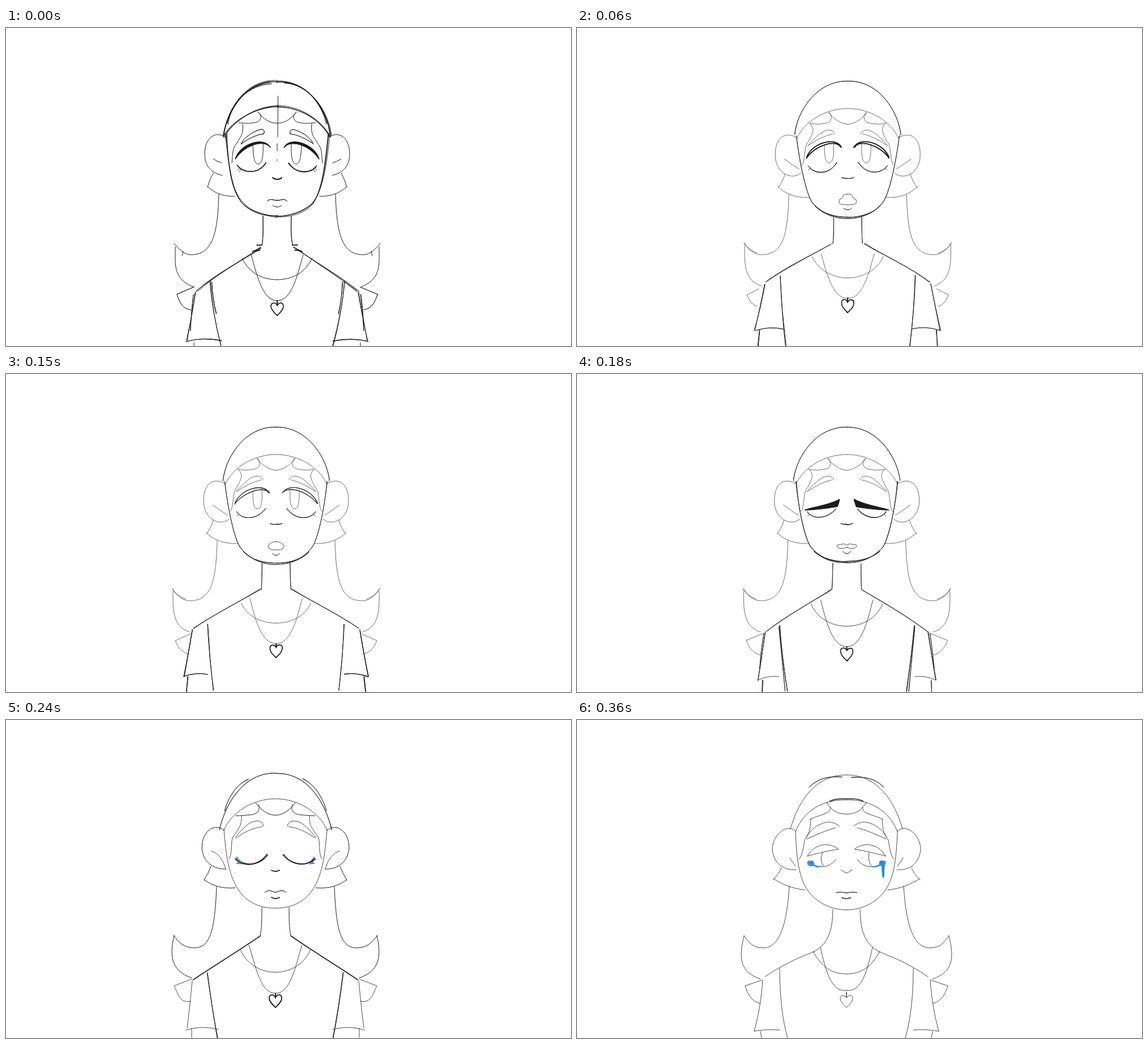
Recreate the animation shown at these times as an HTML page with a canvas. Size 998 by 561 pixels, loop 390 ms.

```html
<!DOCTYPE html>
<html lang="en">
<head>
<meta charset="utf-8">
<title>Sketch loop</title>
<style>
html, body { margin: 0; width: 100%; height: 100%; overflow: hidden; background: #fff; }
canvas { display: block; }
</style>
</head>
<body>
<canvas id="stage" width="998" height="561"></canvas>
<script>
const ctx = document.getElementById('stage').getContext('2d');
const STEP = 30, STEPS = 13, INK = '#1c1c1c', BLUE = '#2389e6';
const axis = [479, 478.2, 477.5, 476.6, 476, 476, 476];

// style key: [strokes, width, jitter, colour, filled]
const styles = {
  l: [1, .65, 0, INK],
  t: [1, .8, 0, INK],
  k: [1, 1, 0, INK],
  d: [2, .8, 1, INK],
  e: [2, 1, 1.2, INK],
  s: [4, .9, 2.6, INK],
  m: [6, .9, 1.7, INK],
  v: [3, 1.2, 1.4, INK],
  h: [2, 1.3, .7, INK],
  b: [1, 1.9, 0, INK],
  f: [2, 1.1, .5, INK, true],
  q: [1, .8, 0, BLUE, true],
  w: [4, .9, 2, BLUE]
};

// Each part: one style per pose, then its path per pose ('' repeats the last).
// x is the distance from the axis; halves are mirrored.
const halves = [
  // headwear
  ['sddddtt',
    'M95 191 C91 148 56 91 0 95', 'M94 188 C90 148 55 92 0 94', '', '',
    'M99 194 C89 148 57 92 0 94', 'M98 190 C86 146 56 95 0 97', 'M99 192 C86 146 56 96 0 97'],
  ['s---d-d', 'M88 168 C78 130 50 100 12 96', '', '', '',
    'M90 160 C82 132 66 112 48 104', 'M86 155 C76 128 60 108 36 101', 'M66 119 C52 104 34 99 8 101'],
  ['slllttt',
    'M92 192 C78 163 40 139 0 139', 'M89 193 C76 165 40 142 0 142', '', '',
    'M91 194 C78 164 42 139 0 139', 'M92 192 C78 163 42 138 0 138', 'M90 197 C76 160 42 140 0 141'],
  ['------e', 'M30 143 C20 138 10 139 0 139'],
  // fringe, curl, side lock
  ['klllkbt',
    'M34 148 C25 160 14 168 0 168', 'M34 149 C25 161 12 169 0 170', '', '',
    'M35 146 C26 158 14 168 0 168', 'M36 145 C24 158 14 169 0 169', 'M35 145 C28 158 19 166 0 166'],
  ['klllkbt',
    'M33 149 C26 154 28 166 40 167 C50 169 58 168 68 167',
    'M33 149 C26 154 27 167 40 168 C50 170 58 170 68 168', '', '',
    'M30 149 C27 156 29 165 42 167 C52 168 60 169 70 169',
    'M27 153 C28 158 28 163 38 168 C46 172 54 174 63 174',
    'M28 153 C29 161 32 163 40 166 C48 169 56 171 64 175'],
  ['kllltlt',
    'M61 169 C59 187 64 191 72 204 C80 214 78 222 80 238',
    'M66 169 C56 180 64 188 69 200 C78 206 74 236 81 242', '', '',
    'M60 169 C60 185 62 188 75 206 C80 215 75 235 82 245',
    'M62 174 C61 195 68 200 75 214 C79 225 77 235 80 241',
    'M63 175 C64 195 66 200 74 212 C76 225 78 240 84 246'],
  // ear, inner ear, lower lobe
  ['klllkbt',
    'M92 193 C105 181 128 190 128 222 C128 246 114 256 97 260',
    'M89 194 C104 184 127 186 128 222 C129 256 99 270 83 256', '', '',
    'M91 195 C104 181 130 193 130 226 C128 250 110 264 87 263',
    'M90 193 C110 181 131 206 131 226 C129 248 113 262 89 260',
    'M90 196 C106 181 131 204 131 228 C129 252 112 266 89 264'],
  ['klllt-t',
    'M113 231 Q105 236 98 238', 'M112 231 Q100 240 86 249', '', '',
    'M113 231 Q96 236 88 262', 'M105 238 Q96 244 89 260', 'M100 243 Q96 250 90 258'],
  ['klllkbt',
    'M113 256 Q120 268 123 281 M123 280 C111 290 99 297 75 297',
    'M111 258 Q114 270 123 282 M123 280 C111 292 94 300 68 299', '', '',
    'M114 258 Q118 270 126 282 M126 282 C110 293 94 298 71 296',
    'M112 258 Q116 270 125 277 M125 278 C110 288 95 293 75 298',
    'M115 261 Q119 272 130 282 M129 280 C112 291 96 297 73 300'],
  // long hair
  ['klllktt',
    'M103 293 C105 360 113 400 152 400 C164 400 174 390 182 380',
    'M104 294 C106 360 112 400 152 400 C165 400 174 392 183 379', '', '',
    'M104 294 C107 360 112 402 143 402 C162 402 170 393 180 380',
    'M102 292 C107 350 110 403 145 403 C165 403 170 395 177 376',
    'M101 293 C105 360 118 402 147 402 C163 402 172 395 181 380'],
  ['klllktt',
    'M180 386 C180 420 184 442 148 457', 'M182 383 C183 420 181 446 153 455', '', '',
    'M179 380 C186 410 188 442 148 455', 'M177 376 C185 415 185 452 148 457',
    'M181 381 C190 418 190 444 152 457'],
  ['klll---', 'M166 394 L168 402', 'M183 379 C178 388 169 394 160 397'],
  ['dlllttt',
    'M147 457 L177 470 C172 486 166 496 153 497',
    'M157 460 L178 471 C174 481 169 488 160 491', '', 'M146 457 L178 470 C172 484 166 492 153 496',
    'M148 457 L179 469 C171 486 168 500 150 496',
    'M147 458 L178 471 C170 488 164 498 152 499', 'M150 459 L179 469 C173 488 166 496 153 500'],
  // face
  ['sddetbt',
    'M91 186 C86 244 80 287 62 309 C46 326 22 332 0 332',
    'M91 190 C85 240 74 290 63 307 C46 328 22 336 0 336',
    'M91 190 C85 240 74 290 64 306 C46 330 22 339 0 339',
    'M90 190 C85 240 74 290 64 305 C46 326 22 333 0 333',
    'M91 193 C87 250 80 282 60 307 C42 327 20 332 0 332',
    'M91 172 C85 235 82 280 66 305 C48 328 26 332 0 332',
    'M90 197 C88 250 83 282 66 304 C46 328 20 335 0 335'],
  ['-eee---', '', 'M58 313 C44 328 20 334 0 334', 'M58 314 C44 331 20 336 0 336', 'M58 312 C44 326 20 331 0 331'],
  // neck, shoulders
  ['edddktt',
    'M25 332 C25 348 24 366 27 382', 'M25 334 C25 350 25 368 26 380', '', '',
    'M24 331 C24 348 24 366 27 381', 'M24 332 C24 350 23 372 30 384', 'M24 334 C25 360 26 392 58 409'],
  ['seeehet',
    'M30 387 C66 412 110 437 143 464', 'M29 381 C66 402 110 422 145 448',
    'M27 379 C66 400 110 420 150 443', 'M27 381 C66 404 108 428 142 454',
    'M27 381 C66 408 106 432 145 458', 'M30 385 C66 408 106 432 145 457',
    'M58 409 C84 419 110 430 144 453'],
  ['h------', 'M27 383 L36 383 M29 387 L44 395 M31 392 L42 393'],
  // collar, necklace
  ['klltttt',
    'M62 406 C50 432 26 444 0 444', 'M63 403 C52 428 26 441 0 441',
    'M60 402 C50 424 26 434 0 434', 'M63 406 C52 432 26 445 0 445',
    'M62 405 C50 432 26 445 0 445', 'M62 404 C48 432 26 447 0 447', 'M59 408 C44 436 26 448 0 448'],
  ['klltttt',
    'M46 400 C37 430 27 482 0 481', 'M47 398 C38 430 27 478 0 477',
    'M46 394 C38 424 27 472 0 470', 'M46 399 C38 430 27 482 0 481',
    'M47 397 C36 430 27 484 0 482', 'M48 398 C38 436 32 468 0 480', 'M46 401 C38 436 28 482 0 477'],
  ['hhhhbtt',
    'M0 481 L0 490 C3 483 11 484 11 491 C11 497 5 502 0 507',
    'M0 476 L0 484 C3 477 11 478 11 485 C11 492 5 497 0 502',
    'M0 470 L0 477 C3 471 11 471 11 478 C11 485 5 490 0 495',
    'M0 481 L0 488 C3 482 11 482 11 489 C11 496 5 501 0 506',
    'M0 483 L0 490 C3 483 11 483 11 491 C11 497 5 502 0 507',
    'M0 483 L0 491 C3 484 12 484 12 491 C12 498 5 503 0 509',
    'M0 480 L0 490 C3 485 11 484 11 491 C11 497 5 502 0 507'],
  // sleeve, cuff, arm, torso
  ['eehettt',
    'M144 466 C148 492 154 522 159 552', 'M147 452 C152 480 158 506 164 533',
    'M152 448 C157 476 163 502 169 527', 'M144 455 C148 482 152 512 157 540',
    'M147 460 C150 490 153 520 156 543', 'M146 458 C148 488 153 520 160 545',
    'M148 458 C150 490 155 520 163 549'],
  ['edetttt',
    'M161 553 Q132 545 98 552', 'M164 534 Q138 525 113 531', 'M169 527 Q144 521 121 526',
    'M157 540 Q138 531 120 534', 'M158 547 Q130 538 101 546', 'M160 545 Q138 540 115 544',
    'M163 549 Q140 545 118 547'],
  ['kehettt',
    'M147 555 L147 561', 'M156 533 L159 561', 'M162 528 L167 560', 'M149 540 L150 560',
    'M148 544 L148 560', 'M149 544 L149 561', 'M152 549 L150 561'],
  ['eeeeett',
    'M119 446 Q115 500 99 561', 'M119 437 Q117 500 110 561', 'M122 440 Q121 500 117 556',
    'M119 444 Q114 500 105 560', 'M120 446 Q112 510 102 561', 'M119 440 Q120 512 108 561',
    'M118 438 Q118 512 104 561'],
  ['e--d---', 'M116 448 Q114 480 108 504 M148 470 Q152 500 153 534', '', '',
    'M120 446 Q114 510 109 560 M147 458 Q152 490 154 520'],
  // nose, mouth, chin
  ['beeebtt', 'M8 264 Q5 267 0 267', 'M10 264 Q6 266 0 265.5', '', '',
    'M7 265 Q4 267 0 267', 'M9 264 Q5 269 0 268', 'M10 264 Q4 269 0 270'],
  ['ktttttt',
    'M0 304 C6 305 12 299 18 306 C12 299 6 305 0 304',
    'M0 293 C12 292 5 300 14 302 C19 313 8 311 0 312',
    'M0 290 C5 292 11 297 11 303 C11 310 5 314 0 314',
    'M0 302 C6 297 10 302 16 301 C21 308 8 309 0 306',
    'M0 304 C6 303 12 297 19 305 C12 297 6 303 0 304',
    'M0 305 C6 304 10 300 19 306 C10 300 6 304 0 305',
    'M0 305 C6 305 10 302 19 305 C10 302 6 305 0 305'],
  ['kkkkbte', 'M8 313 Q4 316 0 316', 'M7 318 Q4 321 0 321', 'M6 320 Q3 323 0 323',
    'M7 313 Q4 317 0 317', 'M7 313 Q4 315 0 315', 'M8 313 Q4 316 0 316', 'M8 314 Q4 315 0 315'],
  // brow
  ['dlllttt',
    'M63 204 C60 193 38 180 27 179 Q20 181 24 187 M24 187 Q42 189 64 204',
    'M71 208 C58 194 46 180 32 180 Q25 181 23 187 M27 187 Q46 191 69 207', '', '',
    'M71 207 C60 194 48 178 31 178 Q23 179 21 187 M23 188 Q46 191 70 208',
    'M69 210 C58 196 44 182 29 182 Q22 183 20 188 M24 187 Q46 189 69 210',
    'M71 207 C62 190 44 180 30 180 Q20 181 13 187 M19 190 Q38 195 70 210'],
  // eyelid, lower lid, lashes
  ['fvef-dt',
    'M74 231 C66 204 22 190 12 211 C24 195 58 207 74 231',
    'M73 229 C65 203 22 190 11 210 C22 195 57 207 73 229',
    'M73 229 C65 203 22 190 11 210 C22 196 57 208 73 229',
    'M74 240 C58 234 32 232 13 221 C14 226 15 230 17 234 C36 237 55 240 74 240',
    'M71 244 C55 256 30 256 13 235 C28 262 52 262 71 244',
    'M69 238 C52 222 26 212 15 224 C30 224 52 230 69 238',
    'M69 240 C56 217 30 215 14 228 C30 230 50 235 69 240'],
  ['veee-dt',
    'M70 243 C60 257 34 258 20 238', 'M70 243 C60 258 32 260 19 237', '', 'M70 243 C60 258 34 256 19 238',
    '', 'M69 246 C56 266 32 264 17 245', 'M67 248 C56 262 32 264 19 246'],
  ['ttttt--', 'M70 251 L66 246 M67 254 L64 249', 'M69 251 L66 247', '', '',
    'M70 242 L65 252 M68 241 L63 249'],
  ['----m--', '', '', '', '', 'M70 245 C55 260 28 257 14 237'],
  ['kll----', 'M43 207 C42 226 41 240 33 240 C26 240 24 222 25 205',
    'M41 206 C41 224 40 238 33 238 C25 238 24 222 25 204'],
  // tears
  ['----q--', '', '', '', '', 'M69 253 L64 250 L60 254 Z'],
  ['-----ww', '', '', '', '', 'M69 249 C78 262 48 262 52 257 C56 249 66 262 48 259 C54 252 64 262 69 249',
    'M68 250 C70 260 57 259 58 251 C64 244 72 256 62 256 C57 255 53 261 45 258'],
  ['-----dq', '', '', '', '', 'M68 248 Q60 259 48 258', 'M66 250 Q59 246 58 253 Q64 258 66 250 Z']
];

const wholes = [
  ['k------', 'M1.5 120 L1 192 M0 204 L0 217 M0 232 L0 234'],
  ['-----dt', '', '', '', '', 'M-38 228 C-43 238 -42 252 -38 258 M45 233 C42 244 44 252 47 258',
    'M-42 234 C-47 243 -45 252 -40 258 M40 234 C38 244 40 252 44 257'],
  ['-----t-', '', '', '', '', 'M-33 228 C-38 240 -37 250 -37 258 M-16 226 L-16 240 M17 226 L17 238'],
  ['------w', '', '', '', '', '', 'M68 249 C66 262 65 270 65 277 C62 270 64 262 63 251'],
  ['------q', '', '', '', '', '', 'M67 252 L66 277 L64 277 L63 260 Z']
];

function fill(part) {
  const poses = [];
  for (let i = 0; i < 7; i++) poses.push(part[i + 1] || poses[i - 1] || '');
  return { keys: part[0], poses };
}
const sets = [halves.map(fill), wholes.map(fill)];

const number = /-?\d+(\.\d+)?/g;
const mix = (a, b, t) => a + (b - a) * t;

function blend(a, b, t) {
  const to = b.match(number) || [];
  if (!t || to.length !== (a.match(number) || []).length) return a;
  let i = 0;
  return a.replace(number, n => mix(+n, +to[i++], t).toFixed(2));
}

function random(seed) {
  let s = Math.imul(seed + 1, 0x9E3779B1);
  return () => {
    s = Math.imul(s ^ (s >>> 15), 0x2C1B3C6D) + 0x6D2B79F5 | 0;
    return ((s ^ (s >>> 13)) >>> 0) / 4294967296 - .5;
  };
}

function sketch(d, key, seed) {
  const [count, width, jitter, colour, solid] = styles[key];
  const rnd = random(seed);
  ctx.strokeStyle = ctx.fillStyle = colour;
  ctx.lineWidth = width;
  for (let i = 0; i < count; i++) {
    const path = new Path2D(i ? d.replace(number, n => (+n + rnd() * 2 * jitter).toFixed(2)) : d);
    if (solid) ctx.fill(path);
    ctx.stroke(path);
  }
}

function draw(step) {
  const k = step >> 1, next = Math.min(k + 1, 6), t = step % 2 / 2;
  const x = mix(axis[k], axis[next], t);
  ctx.setTransform(1, 0, 0, 1, 0, 0);
  ctx.fillStyle = '#fff';
  ctx.fillRect(0, 0, 998, 561);
  ctx.lineCap = ctx.lineJoin = 'round';
  sets.forEach((set, whole) => set.forEach((part, i) => {
    const key = part.keys[k];
    if (key === '-') return;
    const d = blend(part.poses[k], part.poses[next], t);
    for (const side of whole ? [1] : [-1, 1]) {
      ctx.setTransform(side, 0, 0, 1, x, 0);
      sketch(d, key, i * 40 + k * 2 + side + 2);
    }
  }));
}

let shown = -1;
function tick() {
  const step = Math.floor(performance.now() / STEP) % STEPS;
  if (step !== shown) draw(shown = step);
  requestAnimationFrame(tick);
}
tick();
</script>
</body>
</html>
```
